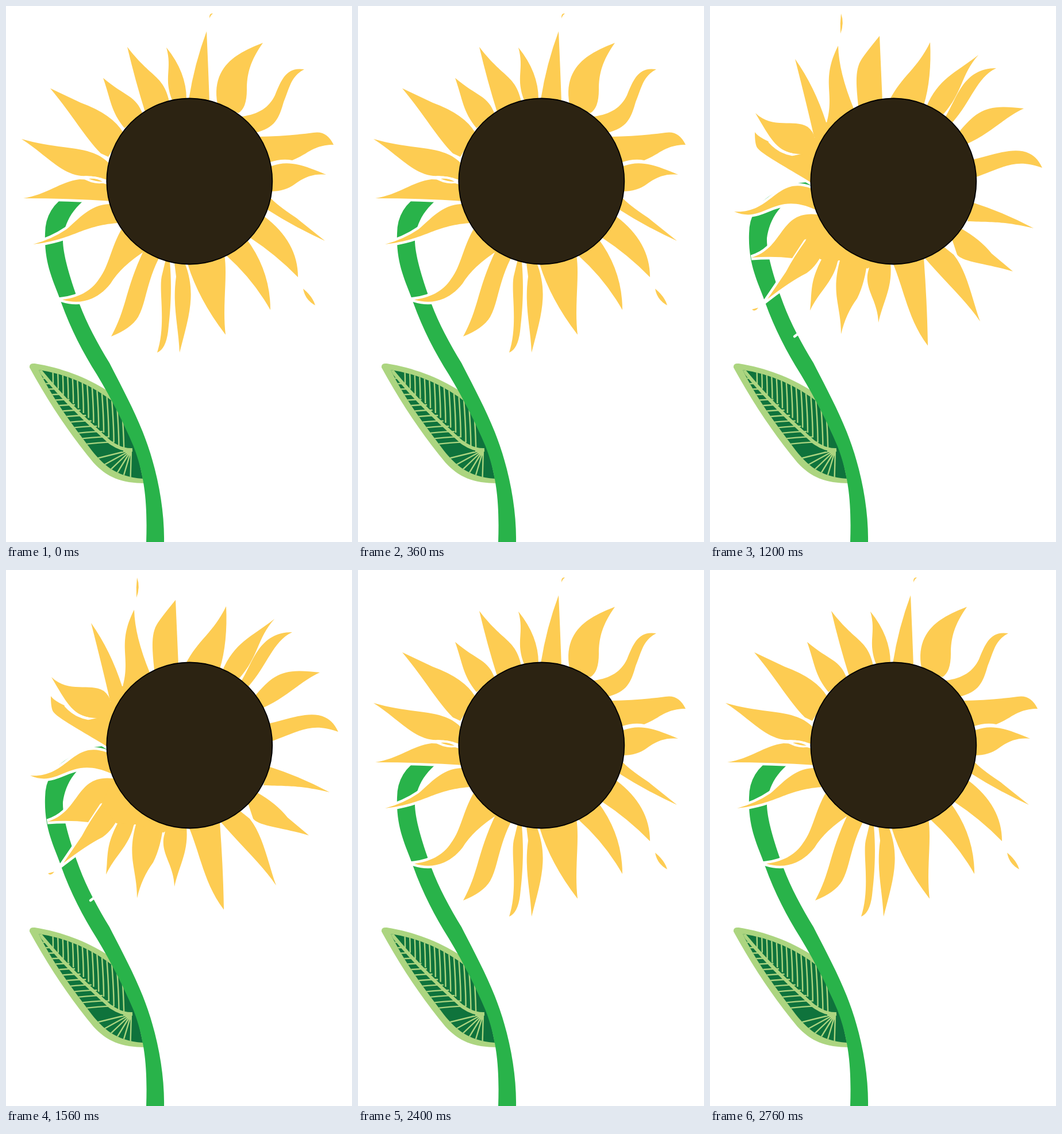
An HTML page for the animation above (3000 ms loop, 602 px wide and 931 px high).

```html
<!DOCTYPE html>
<html lang="en">
<head>
<meta charset="utf-8">
<title>Sunflower</title>
<style>
  html, body { margin: 0; width: 100%; height: 100%; overflow: hidden; background: #fff; }
  svg { display: block; width: 602px; height: 931px; }
  .pose { display: none; fill: #fdcc52; }
  .pose.on { display: inline; }
  .halo { stroke: #fff; stroke-width: 9; stroke-miterlimit: 8; fill: #fff; }
  .pose .gap { fill: none; stroke: #fff; stroke-width: 4.5; stroke-linecap: round; }
  .pose .hole { fill: #fff; }
  .veins { fill: none; stroke: #acd580; stroke-width: 2.4; }
</style>
</head>
<body>
<svg viewBox="0 0 602 931">
  <clipPath id="blade"><path d="M57 632Q130 643 190 690L226 765L238 821C190 818 168 795 150 773C110 720 80 680 57 632Z"/></clipPath>
  <path fill="#acd580" d="M41 628Q40 620 50 621C95 628 140 645 176 668L240 780L243 829C200 829 175 818 152 793C112 745 75 690 41 628Z"/>
  <g clip-path="url(#blade)">
    <rect x="40" y="620" width="210" height="210" fill="#0f733c"/>
    <path class="veins" id="veins"/>
    <path class="veins" style="stroke-width:6" d="M50 622C100 685 150 730 180 757Q200 772 220 771"/>
  </g>
  <path fill="#29b34a" d="M175 306Q138 306 110 326Q68 350 68 395C66 450 84 480 96 515C113 562 134 602 158 640C185 685 205 725 222 765C243 820 246 870 244 931H275C276 870 262 800 238 740C222 700 203 665 180 620C160 588 140 550 128 518C112 475 98 430 99 403C104 370 120 340 175 312Z"/>

  <g class="pose">
    <path d="M318 162Q328 100 349 44Q352 110 354 168"/>
    <path d="M368 170C360 128 378 102 402 86Q418 75 447 64C425 95 419 118 419 145Q419 178 404 186"/>
    <path d="M410 192C440 188 458 176 468 155C480 126 488 106 519 110C496 122 494 140 483 167C475 195 468 212 434 220"/>
    <path d="M440 227Q490 226 535 220Q558 216 570 241C535 241 524 258 498 268Q480 264 457 272"/>
    <path d="M462 278C490 268 512 274 557 293C535 291 520 297 503 309Q486 322 460 322"/>
    <path d="M458 331Q470 345 505 368L555 408Q500 383 452 352"/>
    <path d="M450 366Q508 410 508 471Q470 432 424 402"/>
    <path d="M418 404Q460 460 460 528Q430 475 383 433"/>
    <path d="M380 432C386 470 376 520 382 571Q335 510 316 448"/>
    <path d="M311 446C332 500 318 540 302 602C300 555 289 520 296 470L293 446"/>
    <path d="M285 444C290 500 284 545 282 565Q278 596 263 602C280 550 264 490 272 465L278 440"/>
    <path d="M268 434C244 480 244 515 230 540Q218 560 183 574C210 525 208 490 240 424"/>
    <path d="M202 386C182 420 180 450 162 474C148 496 124 507 98 510C130 520 160 510 182 482Q200 452 244 424"/>
    <path d="M180 344C145 345 125 372 105 388Q80 405 47 414C120 405 130 382 194 377"/>
    <path d="M176 310Q150 301 128 301C95 305 70 328 30 334Q110 334 184 339"/>
    <path d="M178 272C145 240 100 252 27 231C70 258 100 298 140 295Q160 296 176 302"/>
    <path class="hole" d="M131 298Q160 291 176 306Q155 313 131 298"/>
    <path d="M144 300Q158 299 168 305Q155 305 144 300"/>
    <path d="M204 220Q185 188 130 168L77 143C120 195 135 225 165 256L178 262"/>
    <path d="M238 188C226 155 208 158 169 125C183 165 182 182 206 212"/>
    <path d="M284 166C274 120 252 125 211 71Q225 130 242 184"/>
    <path d="M314 162Q314 115 279 72C290 110 273 125 290 166"/>
    <path d="M354 22Q353 12 360 13Q355 17 354 22"/>
    <path d="M517 491Q534 505 538 520Q520 510 517 491"/>
  </g>

  <g class="pose">
    <path d="M260 174C280 120 278 95 288 77Q294 68 311 64Q305 95 312 118L320 168"/>
    <path d="M300 168L309 145Q312 118 336 96L356 66Q348 100 359 130V168"/>
    <path class="gap" d="M314 119Q307 130 308 150"/>
    <path d="M366 168Q400 145 467 102Q432 152 394 182"/>
    <path d="M402 190C436 164 470 160 512 168C482 174 478 202 432 214"/>
    <path d="M436 222Q500 206 550 231C510 235 500 256 456 264"/>
    <path d="M460 282Q495 310 567 318Q525 320 505 333Q485 342 458 339"/>
    <path d="M458 348C500 350 515 370 573 404C535 388 505 392 484 382L446 372"/>
    <path d="M444 378L500 391Q550 405 560 440Q540 415 490 409C460 402 450 394 436 386"/>
    <path d="M428 400C480 420 500 455 509 508C475 475 445 462 405 418"/>
    <path d="M390 428C430 470 456 548 420 570C420 510 394 462 344 444"/>
    <path d="M326 444Q330 520 316 589C315 530 280 490 288 444"/>
    <path d="M280 440C262 490 262 525 234 579C234 525 224 500 234 470L254 436"/>
    <path d="M218 408C170 450 170 500 134 551C175 525 210 505 228 470L252 432"/>
    <path class="hole" d="M229 471Q229 444 252 431Q252 454 229 471"/>
    <path d="M234 465Q235 448 247 438Q246 453 234 465"/>
    <path d="M188 373C122 388 115 428 66 475C110 455 160 450 216 410"/>
    <path d="M180 336Q155 335 138 346C120 362 110 372 76 382Q130 382 150 374Q170 366 190 368"/>
    <path d="M180 288C105 284 110 300 38 325Q100 324 180 331"/>
    <path d="M182 254C130 247 110 262 60 263C110 264 135 281 182 282"/>
    <path d="M190 222Q150 212 100 202L56 186C95 215 110 245 190 250"/>
    <path d="M214 212C206 170 152 180 103 125C112 160 118 200 134 204L180 214"/>
    <path d="M210 200L176 210L154 252L160 284L162 333L176 366L220 372"/>
    <path d="M248 182C248 100 190 135 171 69C158 108 182 120 200 134C218 152 220 170 216 206"/>
    <path d="M28 166L36 174Q28 175 28 166"/>
    <path d="M534 163Q545 154 567 153Q550 165 534 163"/>
  </g>

  <g class="pose">
    <path d="M312 164C335 120 360 110 383 63Q386 125 372 172"/>
    <path d="M376 176C398 125 425 118 467 85C436 120 440 150 406 188"/>
    <path d="M410 192C430 160 440 108 498 108C464 124 455 165 422 202"/>
    <path d="M432 220C466 180 482 170 546 178C510 195 490 220 446 240"/>
    <path d="M456 267C500 258 555 230 578 281C530 264 512 280 460 298"/>
    <path d="M456 341Q510 358 563 386C510 374 500 376 448 374"/>
    <path d="M436 386Q470 405 490 430L527 461C480 447 440 445 430 432L420 402"/>
    <path d="M404 416L424 432C448 462 456 510 470 548C444 510 410 480 374 438"/>
    <path d="M372 438Q378 520 379 590C345 545 340 500 318 446"/>
    <path d="M314 446C318 490 302 510 293 550C292 510 266 490 276 458L280 438"/>
    <path d="M274 440Q270 480 256 508Q236 535 228 570C228 520 210 500 226 442L234 420"/>
    <path d="M236 420L222 444C214 480 190 495 174 529C178 490 174 480 194 440L210 400"/>
    <path d="M166 408Q145 437 132 462L100 509Q140 478 168 464Q188 450 200 420V400"/>
    <path d="M186 362C120 355 130 420 72 437Q110 434 143 438L164 406L210 390"/>
    <path d="M186 362L166 408L192 440L226 442L274 456L300 440"/>
    <path d="M176 317C115 294 108 362 42 357C95 380 110 320 184 354"/>
    <path d="M78 219Q84 228 108 238Q120 255 145 260L190 250L178 308C145 287 90 258 82 246Q78 240 78 219"/>
    <path d="M79 186C110 215 145 195 170 210Q180 218 182 229L200 230L180 260L144 256C115 250 105 230 79 186"/>
    <path class="gap" d="M104 236Q120 254 143 258"/>
    <path d="M148 92Q182 140 202 202L230 200L190 240L181 227Q168 170 148 92"/>
    <path d="M223 69Q224 115 250 178L210 220L203 203C218 150 192 130 223 69"/>
    <path d="M295 52L300 166L258 174C254 135 252 110 264 92Q272 80 295 52"/>
    <path d="M228 13Q234 30 227 48Q226 30 228 13"/>
    <path d="M73 527L84 524Q78 532 73 527"/>
    <path class="gap" d="M147 574L155 568"/>
  </g>

  <g class="pose">
    <path d="M296 166C304 90 312 48 352 43C322 68 320 125 335 168"/>
    <path d="M374 174C394 125 418 122 447 90C418 138 430 155 400 188"/>
    <path d="M420 202Q440 178 475 164L508 145C478 188 476 215 444 232"/>
    <path d="M446 237Q500 226 571 227C520 242 505 262 458 278"/>
    <path d="M460 294Q500 302 583 327C520 327 520 344 458 341"/>
    <path d="M452 354Q495 362 518 396C485 382 475 396 440 387"/>
    <path d="M430 394Q455 400 478 425Q490 440 516 464Q480 453 450 451Q420 445 398 424"/>
    <path d="M392 428Q420 440 436 468L461 502Q405 478 386 456L376 436"/>
    <path d="M390 430L383 460Q410 495 420 567C395 530 365 510 350 470L342 468L332 444"/>
    <path d="M328 446C352 500 328 530 317 575C316 520 300 510 288 496Q268 470 284 440"/>
    <path d="M276 438C236 465 244 490 249 525C254 560 247 572 231 579C246 545 222 525 222 485Q222 450 240 430"/>
    <path d="M180 400C130 415 150 455 107 487Q140 476 158 477Q165 470 190 466Q220 460 238 434L260 400"/>
    <path d="M190 372L160 376Q110 380 39 392Q110 393 190 404"/>
    <path d="M162 376L200 370L220 420L178 402"/>
    <path d="M176 319Q100 326 41 315C90 365 145 345 160 374L192 376"/>
    <path d="M178 272C130 268 125 262 47 240C85 290 110 314 178 313"/>
    <path d="M208 214C160 185 150 194 85 160C130 215 130 250 176 274"/>
    <path d="M131 87Q150 115 178 136Q190 165 224 200L208 212C165 180 155 165 131 87"/>
    <path d="M162 65C175 100 210 125 240 186L228 192C190 150 165 110 162 65"/>
    <path d="M243 41Q246 90 276 170L246 176C242 140 212 125 243 41"/>
    <path d="M0 293Q12 294 20 304L0 298"/>
    <path d="M430 586Q434 592 433 597L429 598"/>
  </g>

  <circle cx="319.3" cy="304.5" r="144" fill="#2c2312" stroke="#000" stroke-width="1.8"/>
</svg>
<script>
  const HOLD = 600, ORDER = [0, 1, 2, 3, 0];
  const poses = [...document.querySelectorAll('.pose')];

  // White rims lie under all petals of a pose.
  for (const pose of poses) {
    const halo = document.createElementNS(pose.namespaceURI, 'g');
    halo.setAttribute('class', 'halo');
    for (const petal of pose.querySelectorAll('path:not([class])')) halo.append(petal.cloneNode());
    pose.prepend(halo);
  }

  const ribY = x => 632 + (x - 57) * 0.965;
  let veins = '';
  for (let i = 0; i < 15; i++) {
    const x = 82 + i * 8.8;
    veins += `M${x} ${ribY(x)}q0 -30 -4 -80`;
  }
  for (let i = 0; i < 13; i++) {
    const x = 72 + i * 9.6;
    veins += `M${x} ${ribY(x)}q-25 0 -60 5`;
  }
  for (let i = 0; i < 6; i++) {
    const a = 1.6 + i * 0.26;
    veins += `M218 771l${80 * Math.cos(a)} ${80 * Math.sin(a)}`;
  }
  document.getElementById('veins').setAttribute('d', veins);

  function draw() {
    const now = ORDER[Math.floor(performance.now() / HOLD) % ORDER.length];
    poses.forEach((pose, i) => pose.classList.toggle('on', i === now));
    requestAnimationFrame(draw);
  }
  draw();
</script>
</body>
</html>
```
